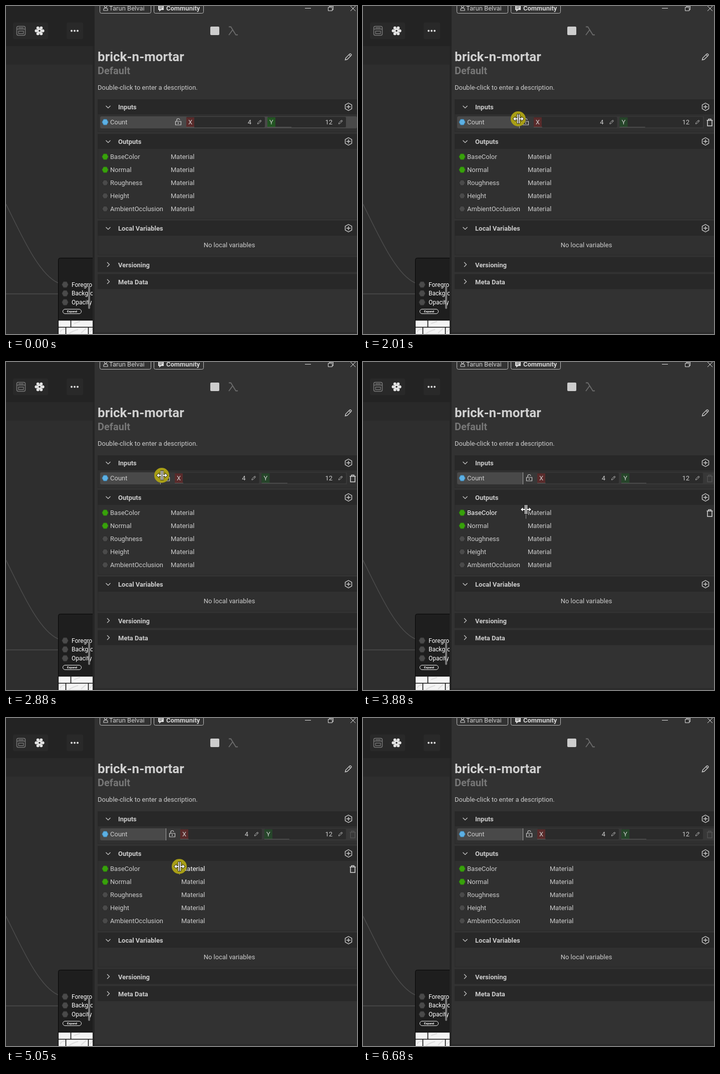
An HTML page with a canvas that plays this animation: 701 by 654 pixels, repeating every 6730 ms.

```html
<!DOCTYPE html>
<html lang="en">
<head>
<meta charset="utf-8">
<style>
html, body { margin: 0; width: 100%; height: 100%; overflow: hidden; background: #323232; }
canvas { display: block; }
</style>
</head>
<body>
<canvas id="stage" width="701" height="654"></canvas>
<script>
const ctx = document.getElementById('stage').getContext('2d');
const LOOP = 6730, LAG = 50;
const LIGHT = '#cdcdcd', PANEL = '#323232', HEADER = '#282828';

// Pointer path: time, x, y
const pointer = [
  [40, 416, 589], [170, 400, 495], [400, 370, 360], [670, 347, 240], [770, 344, 227],
  [1070, 344, 227], [1090, 334, 222], [1240, 334, 222], [1250, 333, 226], [1420, 332, 226],
  [1720, 332, 226], [1960, 313, 225], [2010, 310, 225], [2350, 291, 225], [2500, 294, 225],
  [2830, 309, 226], [2880, 311, 226], [3040, 320, 226], [3090, 320, 227], [3300, 312, 260],
  [3550, 318, 302], [3750, 325, 294], [4060, 325, 294], [4130, 324, 296], [4460, 324, 296],
  [4700, 331, 296], [5000, 346, 296], [5050, 346, 296], [5470, 362, 298], [5520, 366, 298],
  [5600, 369, 298], [5800, 369, 298], [6070, 420, 589]
];
const outputs = ['BaseColor', 'Normal', 'Roughness', 'Height', 'AmbientOcclusion'];

function pointerAt(t) {
  const i = pointer.findIndex(k => k[0] > t);
  if (i === 0) return pointer[0].slice(1);
  if (i < 0) return pointer[pointer.length - 1].slice(1);
  const [a, b] = [pointer[i - 1], pointer[i]];
  const p = (t - a[0]) / (b[0] - a[0]);
  return [a[1] + (b[1] - a[1]) * p, a[2] + (b[2] - a[2]) * p];
}

function draggedX(t, start, end, rest) {
  return t < start + LAG ? rest : pointerAt(Math.min(t - LAG, end))[0];
}

function rect(x, y, w, h, color, r = 0) {
  ctx.fillStyle = color;
  ctx.beginPath();
  ctx.roundRect(x, y, w, h, r);
  ctx.fill();
}

function frame(x, y, w, h, color, r = 0, width = 1) {
  ctx.strokeStyle = color;
  ctx.lineWidth = width;
  ctx.beginPath();
  ctx.roundRect(x, y, w, h, r);
  ctx.stroke();
}

function stroke(path, color, width = 1, x = 0, y = 0) {
  ctx.save();
  ctx.translate(x, y);
  ctx.strokeStyle = color;
  ctx.lineWidth = width;
  ctx.stroke(new Path2D(path));
  ctx.restore();
}

function fill(path, color, x = 0, y = 0) {
  ctx.save();
  ctx.translate(x, y);
  ctx.fillStyle = color;
  ctx.fill(new Path2D(path));
  ctx.restore();
}

function disc(x, y, r, color) {
  ctx.fillStyle = color;
  ctx.beginPath();
  ctx.arc(x, y, r, 0, 7);
  ctx.fill();
}

function label(text, x, y, color = LIGHT, size = 13, weight = 400, align = 'left') {
  ctx.font = `${weight} ${size}px Roboto, sans-serif`;
  ctx.textAlign = align;
  ctx.fillStyle = color;
  ctx.fillText(text, x, y);
}

function hexPort(x, y, color, edge) {
  const shape = 'M-6 0L-3 -5.5H3L6 0L3 5.5H-3Z';
  fill(shape, color, x, y);
  stroke(shape, edge, 1, x, y);
}

function pencil(x, y, scale, color = LIGHT) {
  ctx.save();
  ctx.translate(x, y);
  ctx.scale(scale, scale);
  stroke('M-6 6L-5 2L3 -6Q4.5 -7 6 -5Q7 -4 6 -3L-2 5ZM1.5 -4.5L4.5 -1.5', color, 1.4);
  ctx.restore();
}

function trash(x, y, color) {
  stroke('M-6 -4.5H6M-2.5 -5V-7H2.5V-5M-4.5 -4V6.5H4.5V-4', color, 1.5, x, y);
}

function lock(x, y) {
  stroke('M-5.5 -1.5H5.5V5.5H-5.5ZM-3 -2V-4Q-3 -7 0 -7Q2.5 -7 3 -4.5', LIGHT, 1.2, x, y);
  rect(x - 1, y + 1, 2, 2, LIGHT);
}

function header(title, y, height, open) {
  rect(183, y, 518, height, HEADER);
  const mid = y + 15;
  stroke(open ? 'M-4.5 -2L0 2.5L4.5 -2' : 'M-2 -4.5L2.5 0L-2 4.5', LIGHT, 1.2, 204, mid);
  label(title, 224, mid + 5, LIGHT, 13, 700);
  if (open) {
    stroke('M0 -7.5L6.5 -3.8V3.8L0 7.5L-6.5 3.8V-3.8ZM-4 0H4M0 -4V4', LIGHT, 1.4, 684, mid);
  }
}

function body(y, bottom) {
  rect(183, y, 518, bottom - y, '#303030');
  stroke(`M183.5 ${y}V${bottom - .5}H701`, '#292929');
}

function drawGraph() {
  rect(0, 0, 177, 654, '#2e2e2e');
  rect(0, 0, 177, 80, '#232323');
  rect(0, 80, 173, 37, '#292929');
  rect(173, 80, 4, 574, '#252525');
  rect(14, 33, 70, 33, '#292929', 3);
  rect(121, 33, 33, 33, '#292929', 3);
  frame(21.5, 40.5, 17, 18, '#777', 3, 1.5);
  stroke('M22 46H38M25 43.5H35M25 50H35V55H25Z', '#777', 1.3);
  for (let i = 0; i < 6; i++) {
    const a = i * Math.PI / 3;
    disc(67 + 6.6 * Math.cos(a), 49.5 + 6.6 * Math.sin(a), 3, '#e4e4e4');
  }
  disc(67, 49.5, 4.8, '#e4e4e4');
  disc(67, 49.5, 1.7, '#292929');
  for (const x of [131, 137, 143]) disc(x, 49.5, 2, '#ddd');

  stroke('M0 395C30 455 65 535 104 552M0 574H104', '#4c4c4c', 1.5);

  ctx.save();
  ctx.beginPath();
  ctx.rect(0, 490, 173, 164);
  ctx.clip();
  rect(104.5, 502.5, 90, 170, '#1e1e1e', 4);
  frame(104.5, 502.5, 90, 170, '#050505', 4);
  ['Foreground', 'Background', 'Opacity'].forEach((name, i) => {
    const y = 555.5 + i * 17.6;
    hexPort(118, y, '#4a4a4a', '#404040');
    label(name, 131, y + 4, '#fff', 12);
  });
  rect(164, 558, 4, 46, '#777', 2);
  frame(113.5, 604.5, 37, 9, '#eee', 4.5);
  label('Expand', 132, 611.3, '#fff', 6, 700, 'center');
  rect(105, 627, 68, 27, '#f4f4f4');
  stroke('M108 650Q113 642 118 645M126 653Q133 648 144 645M150 652L160 643M168 650L173 644M136 633L148 629', '#dedede', 2);
  stroke('M105 626.5H173M105 640.5H173M129.5 627V640M119.5 641V654M164.5 641V654', '#111', 1.6);
  ctx.restore();
}

function drawPanel() {
  frame(187.5, -8, 102, 22.5, '#bdbdbd', 3);
  frame(295.5, -8, 99, 22.5, '#bdbdbd', 3);
  stroke('M-4 5V3Q-4 0 0 0Q4 0 4 3V5ZM2.3 -3A2.3 2.3 0 1 1 -2.3 -3A2.3 2.3 0 1 1 2.3 -3', LIGHT, 1.2, 199, 4);
  label('Tarun Belvai', 206, 9);
  fill('M304 -1H315V8H310L306 11V8H304Z', '#ddd');
  stroke('M306 2H313M306 5H311', PANEL);
  label('Community', 320, 9, '#d6d6d6', 13, 700);
  stroke('M597 4.5H609M643.5 2.5H651.5V9.5H643.5ZM646 2V.5H653.5V7.5H652M688 0L698 10M698 0L688 10', '#ddd');

  rect(408, 41, 18, 17, LIGHT, 2);
  stroke('M445 41.5H449L459 57.5H463M453 47L445 58', '#6c6c6c', 1.8);

  label('brick-n-mortar', 183, 110, '#d0d0d0', 26, 700);
  label('Default', 183, 136, '#777', 20, 700);
  label('Double-click to enter a description.', 183, 167);
  pencil(683.5, 101.5, 1);

  header('Inputs', 186, 30, true);
  body(216, 251);
  header('Outputs', 255, 30, true);
  body(285, 424);
  header('Local Variables', 428, 30, true);
  body(458, 497);
  label('No local variables', 446, 481, LIGHT, 13, 400, 'center');
  header('Versioning', 500.5, 30, false);
  header('Meta Data', 534.5, 30, false);
  rect(177, 650, 524, 4, '#2c2c2c');
}

function numberField(x, width, axis, value, color) {
  rect(x, 221, width, 21, '#2b2b2b', 2);
  rect(x, 241, width * value / 39.2, 1, '#5a5a5a');
  rect(x, 222, 16, 19, color);
  label(axis, x + 8, 236, LIGHT, 13, 400, 'center');
  label(value, x + width - 27, 236, LIGHT, 13, 400, 'right');
  pencil(x + width - 11, 231.5, .6);
}

function drawCount(t, hovered) {
  const split = draggedX(t, 1720, 3040, 332);
  const touched = t >= 1420;
  rect(188, 220, 513, 24, '#494949', 3);
  if (touched) rect(split, 220, 701 - split, 24, '#383838');
  hexPort(198, 231.5, '#5cb0e4', '#3d85b5');
  label('Count', 208, 236, hovered && pointerAt(t)[0] < split && t < 1420 ? '#fff' : LIGHT);
  if (touched) rect(Math.round(split) - 1, 220, 1, 24, '#a5a5a5');
  lock(split + 12, 231.5);
  const x = split + 28, width = (679 - x - 5) / 2;
  numberField(x, width, 'X', 4, '#592b2b');
  numberField(x + width + 5, width, 'Y', 12, touched ? '#26452a' : '#235523');
  if (hovered) {
    rect(681, 220, 20, 24, '#303030');
    trash(692.5, 232.5, '#d6d6d6');
  } else if (touched) {
    trash(692.5, 232.5, '#505050');
  }
}

function drawOutputs(t, hoverRow, px) {
  const split = draggedX(t, 4460, 5600, 325);
  outputs.forEach((name, i) => {
    const y = 300.5 + i * 26, hovered = i === hoverRow;
    hexPort(198, y, i < 2 ? '#38a10b' : '#4a4a4a', i < 2 ? '#2c850a' : '#292929');
    const onName = px <= split && t < 4460;
    label(name, 208, y + 4.5, hovered && onName ? '#fff' : LIGHT);
    label('Material', split + 4, y + 4.5, hovered && !onName ? '#fff' : LIGHT);
    if (hovered) {
      trash(692.5, y + 1, '#d6d6d6');
      if (t > 3700) rect(Math.round(split), y - 12, 1, 24, '#909090');
    }
  });
}

function drawPointer(t, x, y) {
  const pressed = (t >= 1720 && t < 3090) || (t >= 4300 && t < 5640);
  const resizing = (t >= 1420 && t < 3140) || (t >= 3700 && t < 5840);
  if (pressed) disc(x, y, 15, '#a89e16');
  if (resizing) {
    const shape = 'M-2.5 -9H-.8V9H-2.5V1H-6V4L-10.5 0L-6 -4V-1H-2.5ZM.8 -9H2.5V-1H6V-4L10.5 0L6 4V1H2.5V9H.8Z';
    stroke(shape, '#171717', 1.5, x + .5, y);
    fill(shape, '#fff', x + .5, y);
  } else {
    const arrow = 'M0 0V16L4 12.5L6.5 18.5L9 17.5L6.5 11.5H11.5Z';
    fill(arrow, '#fff', x, y);
    stroke(arrow, '#111', 1, x, y);
  }
}

function draw(t) {
  const visible = t >= 40 && t < 6070;
  const [x, y] = pointerAt(t);
  const hoverRow = visible && y >= 288 && y < 418 ? Math.floor((y - 288) / 26) : -1;
  rect(0, 0, 701, 654, PANEL);
  drawGraph();
  drawPanel();
  drawCount(t, visible && y >= 217 && y < 247);
  drawOutputs(t, hoverRow, x);
  if (visible) drawPointer(t, x, y);
}

const start = performance.now();
function tick() {
  draw((performance.now() - start) % LOOP);
  requestAnimationFrame(tick);
}
tick();
</script>
</body>
</html>
```
